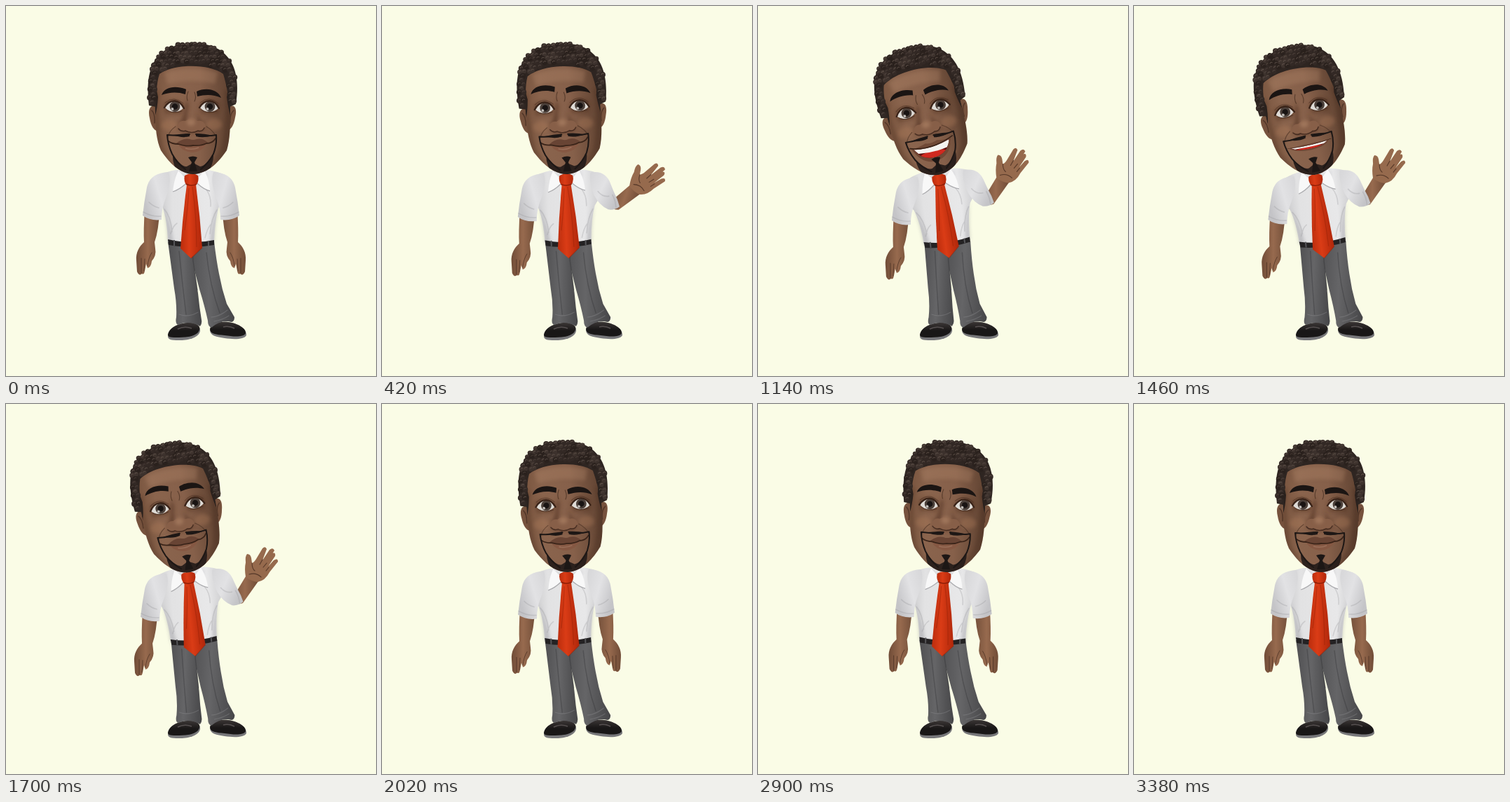
Write an HTML page that moves like this. It is 528x528 px and loops after 3460 ms.

```html
<!DOCTYPE html>
<html lang="en">
<head>
<meta charset="utf-8">
<title>Waving man</title>
<style>
html, body { margin: 0; width: 100%; height: 100%; overflow: hidden; background: #fafce6; }
svg { display: block; width: 100vw; height: 100vh; }
.line { fill: none; stroke: #3a2419; stroke-linecap: round; }
.beard { fill: none; stroke: #1d1715; stroke-linecap: round; stroke-linejoin: round; }
.fold { fill: none; stroke: #8f8f94; stroke-width: 1.6; stroke-linecap: round; opacity: .28; }
.soft { filter: url(#blur); }
</style>
</head>
<body>
<svg viewBox="0 0 528 528">
<defs>
  <filter id="blur" x="-40%" y="-40%" width="180%" height="180%"><feGaussianBlur stdDeviation="2.6"/></filter>
  <linearGradient id="face" x1="0" x2="1">
    <stop offset="0" stop-color="#79553f"/><stop offset=".22" stop-color="#8a644d"/>
    <stop offset=".6" stop-color="#86604a"/><stop offset="1" stop-color="#5f4231"/>
  </linearGradient>
  <linearGradient id="skin" x1="0" x2="1">
    <stop offset="0" stop-color="#74503a"/><stop offset=".5" stop-color="#976a4e"/><stop offset="1" stop-color="#704c37"/>
  </linearGradient>
  <linearGradient id="shirt" x1="0" x2="1">
    <stop offset="0" stop-color="#c4c4c6"/><stop offset=".25" stop-color="#e2e2e3"/>
    <stop offset=".75" stop-color="#e8e8e9"/><stop offset="1" stop-color="#c8c8ca"/>
  </linearGradient>
  <linearGradient id="sleeve" x1="0" x2="1" y2=".5">
    <stop offset="0" stop-color="#d6d6d8"/><stop offset=".5" stop-color="#e2e2e4"/><stop offset="1" stop-color="#c4c4c7"/>
  </linearGradient>
  <linearGradient id="tie" x1="0" x2="1">
    <stop offset="0" stop-color="#bb2d0d"/><stop offset=".4" stop-color="#da3c16"/><stop offset="1" stop-color="#b0270a"/>
  </linearGradient>
  <linearGradient id="pants" x1="0" x2="1">
    <stop offset="0" stop-color="#505052"/><stop offset=".45" stop-color="#656567"/><stop offset="1" stop-color="#464648"/>
  </linearGradient>
  <linearGradient id="shoe" y2="1" x2="0">
    <stop offset="0" stop-color="#3b3635"/><stop offset=".55" stop-color="#191717"/>
  </linearGradient>
  <clipPath id="mouthClip"><path d="M239 197Q264 202 291 194Q285 214 264 214Q246 213 239 197Z"/></clipPath>
  <clipPath id="faceClip"><path id="faceShape" d="M218 94C212 112 212 135 213 152C213 175 215 192 221 206C232 222 246 239 267 240C289 239 304 222 315 206C320 190 320 170 320 150C320 130 316 110 310 94C292 80 238 80 218 94Z"/></clipPath>
  <g id="eye">
    <path d="M-13 1Q-8-8 1-8Q9-7 13 2Q8 7 0 7Q-8 7-13 1Z" fill="#dedbd6"/>
    <circle cx="1" cy="-.5" r="7.4" fill="#4b403a"/>
    <circle cx="1" cy="-.5" r="4.2" fill="#191413"/>
    <circle cx="-2.5" cy="3" r="1.9" fill="#f5f3f0" opacity=".7"/>
    <path d="M-14 1Q-8-9 1-8.5Q9-8 14 2" class="line" stroke-width="2.4"/>
    <path d="M-11 4Q-2 11 11 6" class="line" stroke-width=".9" opacity=".7"/>
    <path d="M-13-6Q0-17 13-5" class="line" stroke-width="1" opacity=".5"/>
  </g>
  <!-- forearm and relaxed hand, drawn for the right side of the stage -->
  <g id="lowArm">
    <path d="M309 292L330 290Q332 320 331 337C338 343 343 352 342 363L341 379Q338 386 334 382Q331 384 330 378L328 368L326 374Q321 373 320 364Q313 356 315 346L316 337Q310 320 309 292Z" fill="url(#skin)"/>
    <path d="M335 360L335 381M330 361L331 378M320 352Q325 360 326 371" class="line" stroke-width="1" opacity=".6"/>
  </g>
  <g id="sleeveArt">
    <path d="M296 237C314 238 324 245 327 259Q331 280 333 299Q322 307 306 305Q306 288 300 274Q291 250 296 237Z" fill="url(#sleeve)"/>
    <path d="M307 300Q320 301 332 294M310 288Q318 286 324 280" class="fold"/>
  </g>
</defs>

<rect width="528" height="528" fill="#fafce6"/>

<g>
  <path d="M231 471C231 461 242 454 258 452C270 451 278 456 277 464C275 473 262 477 247 477C235 477 231 476 231 471Z" fill="#77777a"/>
  <path d="M231 469C233 460 242 454 258 452C270 451 278 456 276 462C274 470 262 473 247 473C235 473 231 473 231 469Z" fill="url(#shoe)"/>
  <path d="M291 463C292 453 305 450 317 451C331 453 344 461 343 470C340 476 325 476 312 474C300 472 292 471 291 463Z" fill="#77777a"/>
  <path d="M291 461C293 452 305 450 317 451C331 453 343 460 342 467C339 473 325 472 312 470C300 469 291 468 291 461Z" fill="url(#shoe)"/>
  <path d="M245 461Q255 456 265 460M310 458Q318 456 326 460" fill="none" stroke="#565050" stroke-width="1.5"/>
</g>

<g id="legs">
  <path d="M260 338L297 336Q300 362 304 382Q308 404 315 425L326 444Q326 450 322 451Q307 447 293 459Q288 457 288 449Q284 430 276 404L266 366Z" fill="url(#pants)"/>
  <path d="M231 336L274 338Q267 356 268 368L274 410Q276 430 279 448Q280 453 277 457Q261 448 246 455Q241 454 243 444Q244 425 240 403Z" fill="url(#pants)"/>
  <path d="M268 346Q265 356 268 370L273 405M247 350Q252 400 257 440M286 352Q291 400 305 438" class="line" style="stroke:#303033" stroke-width="1.4" opacity=".35"/>
  <path d="M247 440Q260 445 274 437M293 444Q305 443 316 434M297 450Q309 448 318 442" class="line" style="stroke:#929296" stroke-width="1.2" opacity=".35"/>
</g>

<g id="body">
  <g id="leftArm">
    <use href="#lowArm" transform="translate(528 0) scale(-1 1)"/>
  </g>
  <path d="M242 234Q220 238 212 248Q208 270 223 286Q230 305 231 337Q264 345 297 338Q298 305 304 286Q322 262 314 242Q302 236 288 234Z" fill="url(#shirt)"/>
  <path class="soft" d="M223 282Q236 312 239 338L231 337Q230 308 223 282ZM304 282Q292 312 291 338L297 338Q298 308 304 282ZM244 238Q265 254 287 238L283 248Q265 258 249 250Z" fill="#8b8b92" opacity=".42"/>
  <path d="M231 333Q264 341 297 334L297 341Q264 347 232 341Z" fill="#242223"/>
  <path d="M240 334v8M289 335v7" stroke="#555558" stroke-width="2"/>
  <path d="M226 290Q235 300 237 322M235 325Q238 314 244 310M301 291Q293 303 291 325M284 331Q287 318 292 312M286 262Q293 272 292 286" class="fold"/>
  <use id="leftSleeve" href="#sleeveArt"/>
  <path d="M258 255L271 255Q277 300 280 345L264 360L249 346Q252 300 258 255Z" fill="url(#tie)"/>
  <path d="M266 258Q272 300 272 344M261 260Q260 285 255 320M264 360L280 345" fill="none" stroke="#8d1e06" stroke-width="1.2" opacity=".4"/>
  <path d="M246 235Q240 246 238 265Q250 261 260 250ZM283 235Q290 246 291 264Q280 261 270 250Z" fill="#f8f8f8"/>
  <path d="M238 265Q250 261 260 250M291 264Q280 261 270 250" fill="none" stroke="#9a9a9e" stroke-width="1.3" opacity=".8"/>
  <path d="M255 242Q265 236 274 242Q276 250 271 256Q265 259 258 256Q253 250 255 242Z" fill="url(#tie)"/>
  <path d="M257 254Q265 258 272 254" fill="none" stroke="#8d1e06" stroke-width="1.4"/>
</g>

<g id="foreDown"><use href="#lowArm"/></g>
<g id="foreUp">
  <path d="M322 279L342 246L360 253L338 284Q328 288 322 279Z" fill="url(#skin)"/>
  <path d="M342 247Q340 235 342 226Q341 217 344 214Q349 214 350 220L351 227Q354 226 357 221L366 206Q370 202 372 207L366 223L376 208Q381 204 383 209L372 227L380 213Q385 211 384 217L374 232L382 223Q388 219 388 225L376 240Q370 252 359 254Q350 253 342 247Z" fill="#966a4d"/>
  <path d="M351 227Q351 235 355 238M366 222L362 229M372 227L367 233M375 233L371 238M347 243Q357 240 364 247" class="line" stroke-width="1.1" opacity=".7"/>
</g>
<use id="sleeveDown" href="#sleeveArt"/>
<g id="sleeveUp">
  <path d="M294 236C308 232 318 238 323 249Q327 258 330 264Q335 272 338 282Q331 288 322 287Q309 282 301 268Q292 250 294 236Z" fill="url(#sleeve)"/>
  <path d="M327 266Q332 274 333 284M306 262Q313 270 322 268" class="fold"/>
</g>

<g id="head">
  <path d="M215 143C206 140 202 148 205 160C207 172 212 180 219 178ZM318 143C327 140 330 147 327 159C325 171 320 179 314 177Z" fill="#76523d"/>
  <path d="M208 149Q213 154 212 167M325 149Q319 154 320 167" class="line" stroke-width="1.5" opacity=".6"/>
  <use href="#faceShape" fill="url(#face)"/>
  <g clip-path="url(#faceClip)">
    <path class="soft" d="M226 95Q265 84 302 95L298 111Q266 103 230 111Z" fill="#ae8467" opacity=".35"/>
    <path class="soft" d="M213 120L219 122Q214 160 224 202L244 234L213 234ZM322 120L312 122Q317 165 306 205L286 236L322 236Z" fill="#3a2115" opacity=".25"/>
    <ellipse class="soft" cx="233" cy="170" rx="11" ry="8" fill="#b07e5c" opacity=".35"/>
    <ellipse class="soft" cx="297" cy="169" rx="11" ry="8" fill="#b07e5c" opacity=".35"/>
    <path class="soft" d="M225 139Q241 127 255 143L250 154L227 154ZM275 143Q290 127 305 139L303 154L279 154Z" fill="#442819" opacity=".35"/>
    <path d="M212 106L217 130Q216 146 213 156ZM320 106L315 130Q317 146 320 156Z" fill="#2a211d"/>
    <path d="M238 212Q250 230 258 229L267 224L277 229Q286 228 296 211Q297 227 285 242H249Q237 228 238 212Z" fill="#201917" opacity=".88"/>
  </g>
  <use href="#eye" x="240" y="144"/>
  <use href="#eye" x="290" y="144"/>
  <path id="brows" d="M222 127C226 115 243 113 257 119L256 126C244 122 233 123 222 127ZM272 122C284 116 302 118 307 131C296 126 285 126 273 129Z" fill="#1b1513"/>
  <path d="M260 122Q257 129 259 135M269 123Q272 130 269 136" class="line" stroke-width="1.1" opacity=".6"/>
  <path class="soft" d="M258 132Q254 158 248 166Q244 179 254 181L277 181Q287 178 280 166L271 150Q278 172 267 174Q254 172 261 143Z" fill="#492b1c" opacity=".5"/>
  <path d="M244 171Q248 162 256 164Q265 158 273 164Q282 162 285 171Q283 179 275 178Q265 184 255 178Q246 179 244 171Z" fill="#875f48"/>
  <ellipse class="soft" cx="264" cy="166" rx="6" ry="5" fill="#b58a6c" opacity=".55"/>
  <path d="M246 175Q250 180 256 178Q265 183 274 178Q280 180 283 174" class="line" stroke-width="1.5" opacity=".8"/>
  <path d="M242 172Q233 178 231 187M286 172Q296 178 300 187" class="line" stroke-width="1.2" opacity=".5"/>
  <g id="closed">
    <path d="M243 196Q253 188 262 190Q267 192 272 190Q281 188 288 195Q279 200 266 199Q253 200 243 196Z" fill="#684434"/>
    <path d="M246 198Q266 202 286 197Q280 208 266 209Q252 208 246 198Z" fill="#855843"/>
    <path d="M232 193Q237 197 246 197Q258 201 267 199Q278 200 286 196Q295 196 299 189" class="line" stroke-width="1.8"/>
    <path d="M256 203Q266 206 275 202" fill="none" stroke="#b08670" stroke-width="1.6" opacity=".5"/>
  </g>
  <g id="open">
    <path d="M236 196Q248 195 257 192Q265 195 274 191Q285 194 294 192Q289 219 264 220Q245 218 236 196Z" fill="#704936"/>
    <g clip-path="url(#mouthClip)">
      <rect x="230" y="188" width="70" height="30" fill="#5b0d0b"/>
      <ellipse cx="265" cy="211" rx="21" ry="7" fill="#cf2a20"/>
      <path d="M234 190H296L286 204Q264 208 244 204Z" fill="#f4f3ef"/>
    </g>
    <path d="M234 194Q264 204 297 190" class="line" stroke-width="1.6"/>
  </g>
  <path d="M262 183Q250 186 230 184Q231 198 237 211Q244 224 256 233M271 183Q284 187 300 184Q301 198 296 211Q289 224 278 233" class="beard" stroke-width="2"/>
  <path d="M262 182Q250 182 238 184Q252 189 262 186ZM271 182Q284 182 295 185Q281 189 271 186ZM260 216Q267 213 273 216L269 223L273 236H261L265 223Z" fill="#1d1715"/>
  <path d="M204 142C199 100 207 75 229 62C251 50 284 50 304 62C326 76 334 102 328 140L319 144C317 125 314 110 310 97C290 82 240 82 219 97C214 112 215 126 214 144Z" fill="#2e2521"/>
  <g id="curls"></g>
</g>
</svg>
<script>
const LOOP = 3460, FIRST = 100, STEP = 80;
const $ = id => document.getElementById(id);

// Each row: step, value
const TILT = [[0, 0], [3, -1.4], [7, -6.2], [10, -10], [14, -13.6], [17, -12.6],
  [21, -9.4], [25, -3], [28, 1], [32, 3], [37, 1.6], [42, 0]];
const LIFT = [[0, 0], [1, .04], [2, .16], [3, .42], [4, .68], [5, .87], [6, .97], [7, 1],
  [21, 1], [22, .85], [23, .3], [24, .05], [25, 0], [42, 0]];
const TALK = [[0, 0], [5, 0], [7, 1], [16, 1], [19, 0], [42, 0]];

function sample(rows, k) {
  let i = 1;
  while (i < rows.length - 1 && rows[i][0] < k) i++;
  const [k0, v0] = rows[i - 1], [k1, v1] = rows[i];
  return v0 + (v1 - v0) * (k - k0) / (k1 - k0);
}

function turn([x, y], deg) {
  const a = deg * Math.PI / 180, c = Math.cos(a), s = Math.sin(a);
  return [x * c - y * s, x * s + y * c];
}

function set(id, value) { $(id).setAttribute('transform', value); }

function choose(first, onId, offId) {
  $(onId).style.display = first ? '' : 'none';
  $(offId).style.display = first ? 'none' : '';
}

function growCurls() {
  let seed = 7, out = '';
  const rnd = () => (seed = seed * 16807 % 2147483647) / 2147483647;
  for (let row = 0; row < 15; row++) {
    for (let col = 0; col < 22; col++) {
      const x = 202 + col * 6.1 + (row % 2) * 3 + rnd() * 2.2;
      const y = 54 + row * 5.8 + rnd() * 2.2;
      const dx = Math.abs(x - 266), dome = (dx / 61) ** 2.4 + (Math.max(0, 114 - y) / 61) ** 2.4;
      const hairline = dx < 50 ? 82 + dx * dx / 200 : 141;
      if (dome > 1 || y > hairline || (y > 92 && dx < 52)) continue;
      const r = 3.2 + rnd() * 1.2, tone = ['#332925', '#3d322d', '#2a211d'][rnd() * 3 | 0];
      out += `<circle cx="${x}" cy="${y}" r="${r}" fill="${tone}"/>` +
        `<path d="M${x - 2} ${y}q1.4-3 4-1.2" fill="none" stroke="#6b5d54" stroke-width="1.1" opacity="${.35 + rnd() * .4}"/>`;
    }
  }
  $('curls').innerHTML = out;
}

function pose(k) {
  const tilt = sample(TILT, k), lift = sample(LIFT, k), lean = tilt * .55;
  set('head', `rotate(${tilt} 266 270)`);
  set('brows', `translate(0 ${-5 * lift})`);
  set('body', `rotate(${lean} 265 293)`);

  // Feet stay put while the hips slide
  const hip = -lean * .8 / 115;
  set('legs', `matrix(1 0 ${-hip} 1 ${hip * 455} 0)`);

  const hang = `rotate(${-lean} 213 258)`;
  set('leftArm', hang);
  set('leftSleeve', `${hang} translate(528 0) scale(-1 1)`);

  const [sx, sy] = turn([43, -37], lean);
  const shoulder = [265 + sx, 293 + sy];
  const upper = -23 * lift, squash = 1 - .12 * lift;
  const [ex, ey] = turn([11, 42 * squash], upper);
  const elbow = [shoulder[0] + ex, shoulder[1] + ey];
  const raised = lift > .55;
  choose(raised, 'foreUp', 'foreDown');
  choose(raised, 'sleeveUp', 'sleeveDown');
  set('sleeveDown', `translate(${shoulder}) rotate(${upper}) scale(1 ${squash}) translate(-308 -256)`);
  set('sleeveUp', `translate(${shoulder}) rotate(${23 * (1 - lift)}) translate(-304 -252)`);
  set('foreDown', `translate(${elbow}) rotate(${-140 * lift}) translate(-319 -298)`);
  set('foreUp', `translate(${elbow}) rotate(${140 * (1 - lift)}) translate(-329 -282)`);

  const talk = sample(TALK, k);
  choose(talk > .3, 'open', 'closed');
  set('open', `translate(0 ${196 * (1 - talk)}) scale(1 ${talk})`);
}

function frame(now) {
  const t = now % LOOP;
  pose(t < FIRST ? 0 : 1 + Math.floor((t - FIRST) / STEP));
  requestAnimationFrame(frame);
}

growCurls();
pose(0);
requestAnimationFrame(frame);
</script>
</body>
</html>
```
